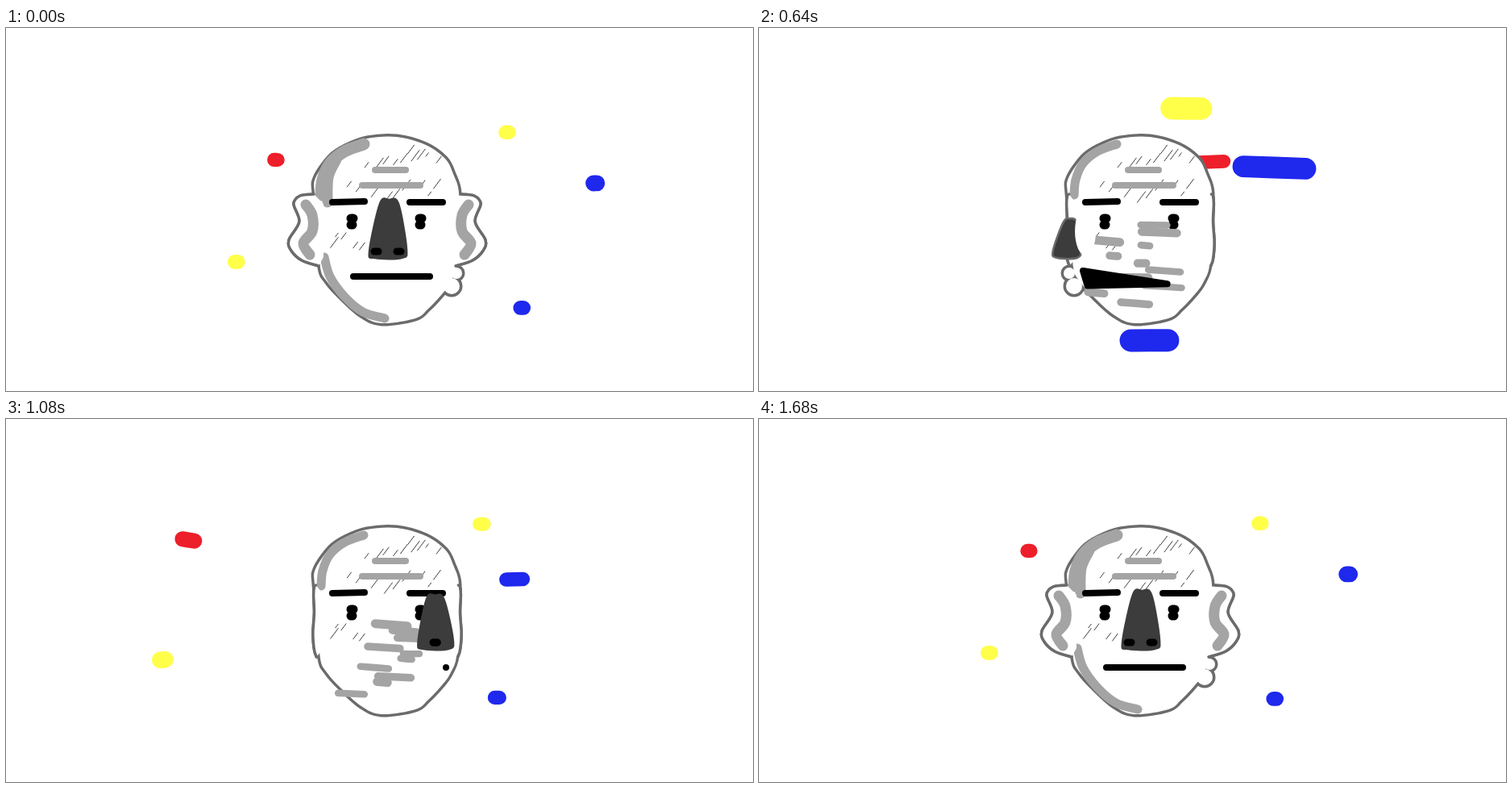
An HTML page with a canvas that plays this animation: 927x450 px, repeating every 1720 ms.

```html
<!DOCTYPE html>
<html lang="en">
<head>
<meta charset="utf-8">
<title>Spinning head</title>
<style>
html, body { margin: 0; width: 100%; height: 100%; overflow: hidden; background: #fff; }
canvas { display: block; }
</style>
</head>
<body>
<canvas id="stage" width="927" height="450"></canvas>
<script>
const ctx = document.getElementById('stage').getContext('2d');
const STEP = 40, FRAMES = 43, RAD = Math.PI / 180;
const LINE = '#6b6b6b', SHADE = '#a4a4a4', DARK = '#3c3c3c', BLACK = '#000', WHITE = '#fff';

// Turn in degrees at a few frames: wind-up, one fast spin, soft stop.
const KEYS = [0, 7, 16, 20, 27, 34, 42];
const HEAD_TURN = [0, 20, -88, -252, -320, -352, -360];
const LATE_TURN = [0, 22, -68, -203, -322, -355, -360];
const EARLY_TURN = [0, 5, -125, -275, -350, -359, -360];

// Orbits in perspective: y = mid + rise * scale; trail is the smear in frames.
const DOTS = [
  { color: '#ed1f2a', turn: LATE_TURN, start: 221, mid: 228, rise: -84, trail: .6 },
  { color: '#ffff4a', turn: EARLY_TURN, start: 133, mid: 156, rise: -34, trail: .2 },
  { color: '#1f28ed', turn: LATE_TURN, start: 92, mid: 225, rise: -33, trail: .7 },
  { color: '#ffff4a', turn: LATE_TURN, start: 237, mid: 257, rise: 40, trail: .22 },
  { color: '#1f28ed', turn: EARLY_TURN, start: 127, mid: 309, rise: 47, trail: .25 }
];

const nums = s => s.match(/-?[\d.]+/g).map(Number);
const HEAD = nums('383,205 384,186 402,160 421,147 448,137 485,135 521,145 545,162 555,181 562,205 558,250 559,294 551,316 541,330 524,348 508,360 466,366 441,356 415,333 398,314 390,297 388,250');
const CROWN_BAND = nums('444,144 420,153 402,168 393,188 391,207');
const JAW_BAND = nums('395,284 402,308 420,333 443,352 470,360');
// Ear points: distance out from the side of the head, y.
const EAR = nums('3,206 20,208 28,218 21,240 34,263 31,276 18,288 -3,295');
const EAR_FOLD = nums('13,219 5,232 5,252 16,267 8,281');

const clamp = (v, lo, hi) => Math.max(lo, Math.min(hi, v));
const mapXY = (p, fn) => p.map((v, i) => i % 2 ? v : fn(v, p[i + 1]));

function random(seed) {
  return () => {
    seed = seed * 16807 % 2147483647;
    return seed / 2147483647;
  };
}

// Monotone cubic through the keys.
function spline(v, f) {
  const n = KEYS.length - 1;
  let i = 0;
  while (i < n - 1 && f >= KEYS[i + 1]) i++;
  const slope = k => (v[k + 1] - v[k]) / (KEYS[k + 1] - KEYS[k]);
  const tangent = k => {
    if (k === 0 || k === n) return 0;
    const a = slope(k - 1), b = slope(k);
    return a * b <= 0 ? 0 : 2 * a * b / (a + b);
  };
  const h = KEYS[i + 1] - KEYS[i], u = (f - KEYS[i]) / h, w = 1 - u;
  return v[i] * w * w * (1 + 2 * u) + v[i + 1] * u * u * (3 - 2 * u)
    + h * u * w * (w * tangent(i) - u * tangent(i + 1));
}

// Smooth path through x,y pairs.
function curve(p, closed) {
  const n = p.length / 2;
  const at = i => {
    const k = closed ? (i + n) % n : clamp(i, 0, n - 1);
    return [p[2 * k], p[2 * k + 1]];
  };
  ctx.beginPath();
  ctx.moveTo(p[0], p[1]);
  for (let i = 0; i < (closed ? n : n - 1); i++) {
    const a = at(i - 1), b = at(i), c = at(i + 1), d = at(i + 2);
    ctx.bezierCurveTo(b[0] + (c[0] - a[0]) / 6, b[1] + (c[1] - a[1]) / 6,
      c[0] - (d[0] - b[0]) / 6, c[1] - (d[1] - b[1]) / 6, c[0], c[1]);
  }
}

function ink(color, width) {
  ctx.strokeStyle = color;
  ctx.lineWidth = width;
  ctx.stroke();
}

function fill(color) {
  ctx.fillStyle = color;
  ctx.fill();
}

function line(p, color, width) {
  curve(p, false);
  ink(color, width);
}

function ellipse(x, y, rx, ry) {
  ctx.beginPath();
  ctx.ellipse(x, y, rx, ry, 0, 0, 7);
}

function orbit(d, f) {
  const a = (d.start + spline(d.turn, clamp(f, 0, FRAMES - 1))) * RAD;
  const scale = 1 / (1 - .4 * Math.cos(a));
  return { x: 469 + 266 * Math.sin(a) * scale, y: d.mid + d.rise * scale, scale, front: Math.cos(a) > 0 };
}

function dots(f, front) {
  for (const d of DOTS) {
    const c = orbit(d, f);
    if (c.front !== front) continue;
    const a = orbit(d, f - d.trail / 2), b = orbit(d, f + d.trail / 2);
    const dx = (b.x - a.x) / 2, dy = (b.y - a.y) / 2, grow = dx < 0 ? -2 : 2;
    line([c.x - dx - grow, c.y - dy, c.x + dx + grow, c.y + dy], d.color, 8 + 12 * c.scale);
  }
}

// Pencil ticks inside a box.
function ticks(rnd, count, x, y, w, h) {
  for (let i = 0; i < count; i++) {
    const px = x + w * (i + rnd()) / count, py = y + h * rnd(), l = 4 + 13 * rnd();
    line([px, py, px + l * .6, py - l * .8], '#333', 1);
  }
}

// Grey strokes left across the face by the spin.
function smears(f, count) {
  const rnd = random(91 + Math.floor(f / 3) * 577);
  for (let i = 0; i < count; i++) {
    const y = 340 - 105 * i / 11 - 5 * rnd(), x = 408 + 90 * rnd();
    line([x, y, x + 8 + 40 * rnd(), y + 3 * rnd()], SHADE, 8 + 3 * rnd());
  }
}

function ears(bulge, look, shape) {
  const left = 385 + 7 * look;
  shape(mapXY(EAR, v => left - v * bulge), left + 9);
  shape(mapXY(EAR, v => 561 + v * bulge), 552);
}

function lump(side) {
  if (!side) return [];
  return [[87, 304, 7], [81, 320, 10]].map(([x, y, r]) => [472 + side * x, y, r, r]);
}

function mouth(yaw, look) {
  if (Math.abs(yaw) > 115) return;
  const slide = look ? 37 * look : Math.min(115, yaw * 5.4);
  let l = 431 + slide, r = 526 + Math.min(20, slide * .18), gape = 0, y = 308;
  if (yaw < 0) {
    l = 431 + yaw * .33;
    r = 526 + yaw * .22;
    gape = -yaw * .21;
    y = 308 + yaw * .08;
  } else if (yaw > 80) {
    l = 404;
    r = 424;
  }
  ctx.beginPath();
  ctx.moveTo(l, y);
  ctx.lineTo(l + gape * .3, y + gape);
  ctx.lineTo(r, 308 + gape * .5);
  ctx.closePath();
  fill(BLACK);
  ink(BLACK, 8);
}

function nose(yaw) {
  const cos = Math.cos(yaw * RAD), sin = Math.sin(yaw * RAD);
  if (cos < -.45) return;
  const x = 474 + 92 * sin, profile = cos < .4;
  const w = .75 + .25 * cos, top = 213 + 24 * (1 - cos), lean = -3 * sin;
  const pts = [-10, top + 5, 1, top, 13, top + 5, 23, 274, 17, 285, -16, 285, -23, 277];
  curve(mapXY(pts, (v, y) => x + v * w + (y < 260 ? lean : 0)), true);
  fill(DARK);
  ink(profile ? LINE : DARK, 2.5);
  if (profile) {
    ellipse(x - Math.sign(sin) * 23, 252, 13, 30);
    fill(WHITE);
  }
  if (yaw < -40) return;
  const gap = 14 * Math.max(0, 1 - (yaw / 20) ** 2);
  for (const dx of [-gap, gap]) line([x + dx - 3, 277, x + dx + 2, 277], BLACK, 9);
}

function face(look) {
  const shift = 18 * look;
  line([458 + shift, 176, 496 + shift, 176], SHADE, 8);
  line([442 + shift, 195, 514 + shift, 195], SHADE, 8);
  line([405 + 9 * look, 216, 445 + 12 * look, 215], BLACK, 8);
  line([501 + 15 * look, 216, 542 + look, 216], BLACK, 8);
  for (const x of [429 + 9 * look, 514 + 16 * look]) {
    line([x - 1, 236, x + 2, 236], BLACK, 11);
    line([x - 1, 244, x + 1, 244], BLACK, 11);
    if (look > .5) line([x + 5, 240, x + 7, 240], BLACK, 9);
  }
}

function draw(f) {
  const turn = spline(HEAD_TURN, f);
  const yaw = (turn + 540) % 360 - 180;
  const look = Math.max(0, turn) / 20;
  const facing = Math.abs(yaw) < 30;
  const bulge = look ? 1 - .1 * look : clamp(1 - Math.abs(yaw) / 45, .12, 1);
  const chin = p => mapXY(p, (x, y) => x + look * .36 * Math.max(0, y - 300));
  const lumps = lump(facing ? 1 : yaw < 0 && yaw > -110 ? -1 : 0);

  ctx.fillStyle = WHITE;
  ctx.fillRect(0, 0, 927, 450);
  ctx.lineCap = ctx.lineJoin = 'round';
  dots(f, false);

  // Outline every part, then fill them all for one joined silhouette.
  ears(bulge, look, p => line(p, LINE, 3.5));
  for (const l of lumps) { ellipse(...l); ink(LINE, 7); }
  curve(chin(HEAD), true);
  ink(LINE, 7);
  fill(WHITE);
  for (const l of lumps) { ellipse(...l); fill(WHITE); }

  line(CROWN_BAND, SHADE, facing ? 15 : 11);
  if (facing) {
    line([410, 163, 400, 185, 399, 216], SHADE, 13);
    line(chin(JAW_BAND), SHADE, 11 + 3 * look);
  }
  ears(bulge, look, (p, inner) => {
    curve(p, false);
    ctx.lineTo(inner, 284);
    ctx.lineTo(inner, 218);
    fill(WHITE);
    line(p, LINE, 3.5);
  });
  if (bulge > .5) {
    line(mapXY(EAR_FOLD, v => 385 + 14 * look - v * bulge), SHADE, 13);
    line(mapXY(EAR_FOLD, v => 561 - 2 * look + v * bulge), SHADE, 13);
  }

  if (look < .5 && yaw < 60) {
    const rnd = random(4242);
    ticks(rnd, 10, 445, 155, 90, 18);
    ticks(rnd, 9, 415, 190, 130, 28);
    ticks(rnd, 5, 395, 255, 45, 20);
  } else if (look) ticks(random(77), 7, 480, 328, 60, 20);

  face(look);
  if (!look) smears(f, Math.round(Math.min(11, Math.abs(yaw) / 4)));
  mouth(yaw, look);
  nose(yaw);
  dots(f, true);
}

const start = performance.now();
let shown = -1;
function tick() {
  const f = Math.floor((performance.now() - start) / STEP) % FRAMES;
  if (f !== shown) draw(shown = f);
  requestAnimationFrame(tick);
}
tick();
</script>
</body>
</html>
```
